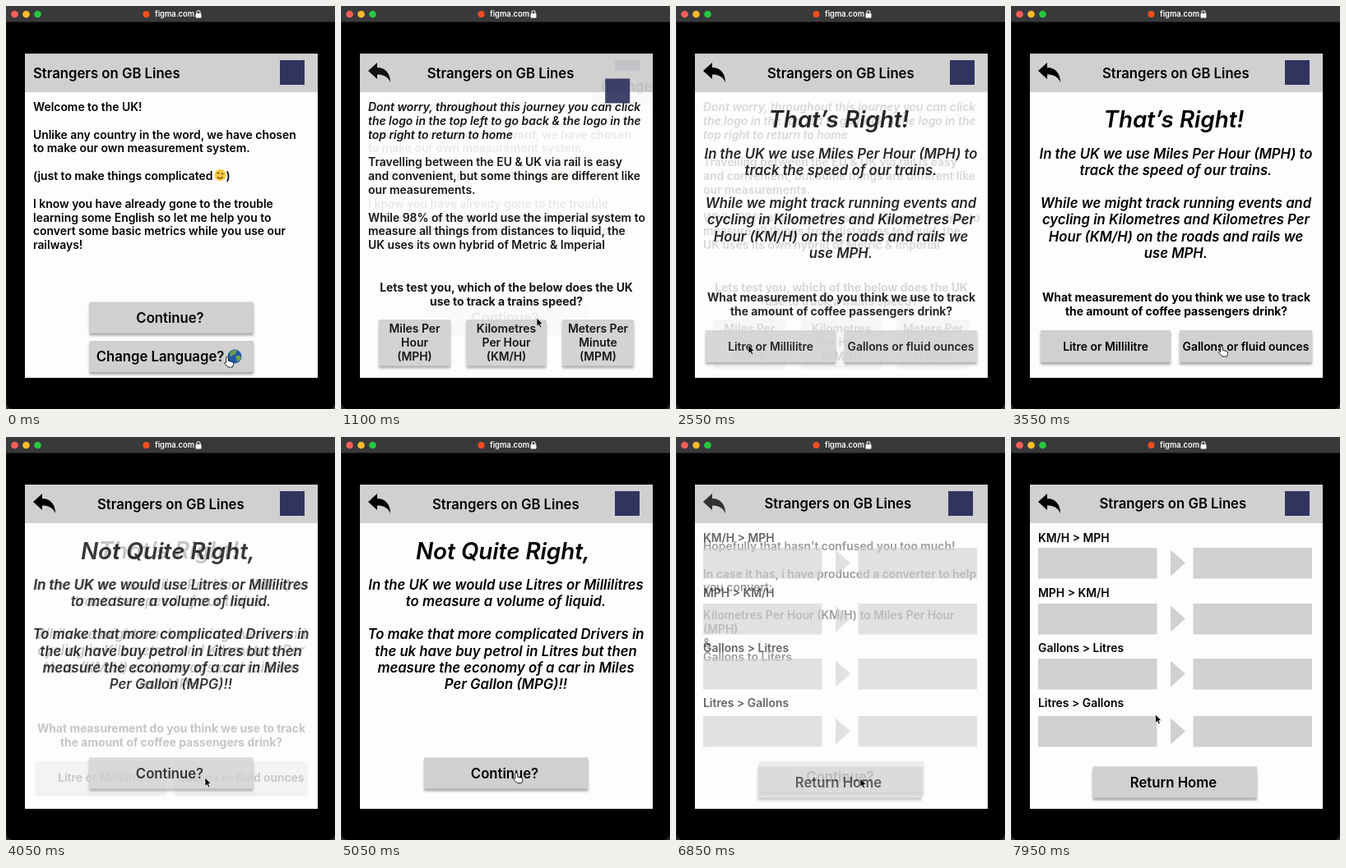
An HTML page for the animation above (8 s loop, 400x491 px).

```html
<!DOCTYPE html>
<html lang="en">
<head>
<meta charset="utf-8">
<title>Rail guide</title>
<style>
  html, body { margin: 0; width: 100%; height: 100%; overflow: hidden; background: #2a2a2c; }
  svg { display: block; width: 400px; height: 491px; }
  text { font-family: Inter, Arial, sans-serif; font-weight: 600; fill: #000; white-space: pre; }
  .button { fill: #d0d0d1; filter: drop-shadow(0 3px 1.5px #0005); }
  .field { fill: #d0d0d1; }
  .mark { fill: #30345f; }
</style>
</head>
<body>
<svg viewBox="0 0 400 491">
  <defs>
    <clipPath id="pageClip"><rect x="23" y="58" width="356" height="395"/></clipPath>
    <path id="back" d="M33 79L44 69V75C54 75 60 82 60 93C57 86 52 83.5 44 83.5V89Z"/>
  </defs>
  <rect x=".5" y="-10" width="399.5" height="501" rx="8"/>
  <rect width="400" height="19.5" fill="#39393b"/>
  <circle cx="10.5" cy="10" r="4.3" fill="#ff5f57"/>
  <circle cx="24.5" cy="10" r="4.3" fill="#febc2e"/>
  <circle cx="38.5" cy="10" r="4.3" fill="#28c840"/>
  <circle cx="170.5" cy="10" r="4" fill="#f24e1e"/>
  <text x="181" y="13.3" font-size="9.3" style="fill:#fff">figma.com</text>
  <rect x="230.5" y="9" width="7" height="5.5" rx="1" fill="#fff"/>
  <path d="M232 9.5V7.8a2 2 0 0 1 4 0V9.5" fill="none" stroke="#fff" stroke-width="1.1"/>
  <g clip-path="url(#pageClip)">
    <rect x="23" y="58" width="356" height="395" fill="#fdfdfd"/>
    <rect x="23" y="58" width="356" height="47" fill="#d0d0d1"/>
    <g id="screens"></g>
    <use id="arrow" href="#back"/>
    <text id="title" font-size="16.7">Strangers on GB Lines</text>
    <rect id="logo" class="mark" x="333" y="66" width="30" height="30"/>
  </g>
  <g id="cursor">
    <path id="pointer" d="M0 0V10.5L2.4 8.3L4 12L5.8 11.2L4.2 7.6H7.4Z" stroke="#fff" stroke-width=".7"/>
    <path id="hand" d="M-1.5 1a1.5 1.5 0 0 1 3 0V4.5L6 5.5Q8 6 7.5 8.5L6.5 12H1L-3.5 7.5Q-3.5 5.5 -1.5 6.5Z"
      fill="#fff" stroke="#111" stroke-width=".9"/>
  </g>
</svg>
<script>
const LOOP = 8000, STEP = 50, FADE = 300;
const SMALL = 13.9, MEDIUM = 16.7, LARGE = 27.8, LEADING = 1.21;
const $ = id => document.getElementById(id);

// Lines of text from a first baseline; an empty string leaves a blank line.
const block = (x, y, lines, { size = SMALL, centred = false, italic = false, weight = 600 } = {}) =>
  lines.map((line, i) => line && `<text x="${x}" y="${y + i * size * LEADING}" font-size="${size}"
    style="font-weight:${weight}${italic ? ';font-style:italic' : ''}"
    text-anchor="${centred ? 'middle' : 'start'}">${line}</text>`).join('');

const button = ({ box: [x, y, w, h], lines, size = MEDIUM, textX = x + w / 2 }) =>
  `<rect class="button" x="${x}" y="${y}" width="${w}" height="${h}"/>` +
  block(textX, y + h / 2 + .364 * size - (lines.length - 1) / 2 * size * LEADING, lines, { size, centred: true });

const converter = (label, baseline, y) => block(33, baseline, [label]) +
  `<rect class="field" x="33" y="${y}" width="144.5" height="37.5"/>
   <rect class="field" x="221.5" y="${y}" width="144.5" height="37.5"/>
   <path class="field" d="M194 ${y + 2.5}L212 ${y + 18.5}L194 ${y + 34.5}Z"/>`;

const wink = `<g transform="translate(260.5 206)"><circle r="7" fill="#fbc93d"/>
  <path d="M-4 -2q1.5 -1.5 3 0M-3.5 2.5q3 3 6.5 0" fill="none" stroke="#5b3512" stroke-width="1.1"/>
  <circle cx="2.7" cy="-1.5" r="1.1" fill="#5b3512"/></g>`;
const globe = `<g transform="translate(278 427)"><circle r="8.5" fill="#2456a8"/>
  <path d="M-6 -5Q-2 -9 3 -7L1 -3L-3 -1L-5 1ZM1 0Q6 -3 8 1Q6 6 3 6Z" fill="#6f9d4c"/></g>`;

const heading = { size: LARGE, centred: true, italic: true };
const answer = { size: MEDIUM, centred: true, italic: true };
const question = { centred: true, weight: 700 };

const screens = [
  {
    titleX: 33, titleY: 87.5, logoX: -147, logoY: 280,
    body: '<rect class="mark" x="333" y="66" width="30" height="30"/>' + block(33, 128, [
      'Welcome to the UK!', '',
      'Unlike any country in the word, we have chosen', 'to make our own measurement system.', '',
      '(just to make things complicated<tspan x="267.5">)</tspan>', '',
      'I know you have already gone to the trouble', 'learning some English so let me help you to',
      'convert some basic metrics while you use our', 'railways!']) + wink,
    buttons: [
      { box: [101.5, 360.5, 199.5, 38], lines: ['Continue?'], textX: 199.5 },
      { box: [101.5, 408, 199.5, 38], lines: ['Change Language?'], textX: 187.5, extra: globe, id: 'language' }]
  },
  {
    titleX: 111, titleY: 87.5, logoX: 0, logoY: 0,
    body: block(33, 128, [
      'Dont worry, throughout this journey you can click', 'the logo in the top left to go back &amp; the logo in the',
      'top right to return to home'], { italic: true }) +
      block(33, 195.3, [
        'Travelling between the EU &amp; UK via rail is easy', 'and convenient, but some things are different like',
        'our measurements.', '', 'While 98% of the world use the imperial system to',
        'measure all things from distances to liquid, the', 'UK uses its own hybrid of Metric &amp; Imperial']) +
      block(201, 348, ['Lets test you, which of the below does the UK', 'use to track a trains speed?'], question),
    buttons: [
      { box: [46, 382, 87, 56.5], lines: ['Miles Per', 'Hour', '(MPH)'], size: SMALL },
      { box: [152.5, 382, 97, 56.5], lines: ['Kilometres', 'Per Hour', '(KM/H)'], size: SMALL },
      { box: [269, 382, 87, 56.5], lines: ['Meters Per', 'Minute', '(MPM)'], size: SMALL }]
  },
  {
    titleX: 111, titleY: 87.5, logoX: 0, logoY: 0,
    body: block(198, 148, ['That’s Right!'], heading) + block(200.5, 185.5, [
      'In the UK we use Miles Per Hour (MPH) to', 'track the speed of our trains.', '',
      'While we might track running events and', 'cycling in Kilometres and Kilometres Per',
      'Hour (KM/H) on the roads and rails we', 'use MPH.'], answer) +
      block(201, 360, ['What measurement do you think we use to track', 'the amount of coffee passengers drink?'], question),
    buttons: [
      { box: [36, 395, 158, 39], lines: ['Litre or Millilitre'], size: SMALL },
      { box: [205, 395, 161, 39], lines: ['Gallons or fluid ounces'], size: SMALL }]
  },
  {
    titleX: 111, titleY: 87.5, logoX: 0, logoY: 0,
    body: block(197, 149, ['Not Quite Right,'], heading) + block(200.5, 185.8, [
      'In the UK we would use Litres or Millilitres', 'to measure a volume of liquid.', '',
      'To make that more complicated Drivers in', 'the uk have buy petrol in Litres but then',
      'measure the economy of a car in Miles', 'Per Gallon (MPG)!!'], answer),
    buttons: [{ box: [101, 390.5, 199.5, 38], lines: ['Continue?'], textX: 199 }]
  },
  {
    titleX: 107.5, titleY: 87.5, logoX: -5, logoY: 0,
    body: '<use href="#back"/>' + block(33, 138, [
      "Hopefully that hasn't confused you too much!", '',
      'In case it has, i have produced a converter to help', 'you convert:', '',
      'Kilometres Per Hour (KM/H) to Miles Per Hour', '(MPH)', '&amp;', 'Gallons to Liters']),
    buttons: [{ box: [101.5, 395, 199.5, 38], lines: ['Continue?'], textX: 199.5 }]
  },
  {
    titleX: 107.5, titleY: 86.5, logoX: 0, logoY: 0,
    body: '<use href="#back"/>' + converter('KM/H &gt; MPH', 128, 135) + converter('MPH &gt; KM/H', 195, 203) +
      converter('Gallons &gt; Litres', 262, 270) + converter('Litres &gt; Gallons', 329, 340),
    buttons: [{ box: [99.5, 401.5, 199.5, 38], lines: ['Return Home'], textX: 197.5 }]
  }
];

const changes = [865, 2345, 3870, 5440, 6720];
const cursorPath = [
  [0, 269, 428], [250, 267, 426], [700, 231, 386], [900, 233, 380], [1100, 238, 380], [1300, 228, 384],
  [1900, 98, 405], [2300, 88, 413], [2800, 88, 413], [3450, 256, 415], [3700, 256, 415], [4050, 242, 415],
  [4650, 242, 415], [5300, 199, 407], [5600, 197, 406], [6300, 213, 414], [6850, 224, 416],
  [7150, 222, 414], [7650, 182, 346], [7950, 175.5, 338]
];

$('screens').innerHTML = screens.map(({ body, buttons }) => `<g>${body}${buttons.map(b =>
  `<g${b.id ? ` id="${b.id}"` : ''}>${button(b)}${b.extra || ''}</g>`).join('')}</g>`).join('');
const layers = [...$('screens').children];

const mix = (a, b, p) => a + (b - a) * p;
const easeOut = t => 1 - (1 - t) ** 1.65;

function cursorAt(time) {
  const next = cursorPath.findIndex(([at]) => at > time);
  if (next < 0) return cursorPath.at(-1).slice(1);
  const [from, to] = [cursorPath[next - 1], cursorPath[next]];
  const t = (time - from[0]) / (to[0] - from[0]), p = t * t * (3 - 2 * t);
  return [mix(from[1], to[1], p), mix(from[2], to[2], p)];
}

function render(time) {
  const current = changes.filter(at => at <= time).length;
  const previous = Math.max(0, current - 1);
  const p = current ? easeOut(Math.min(1, (time - changes[previous]) / FADE)) : 1;
  const from = screens[previous], to = screens[current];
  const between = key => mix(from[key], to[key], p);

  layers.forEach((layer, i) => {
    const opacity = i === current ? p : i === previous ? 1 - p : 0;
    layer.style.display = opacity ? '' : 'none';
    layer.style.opacity = opacity;
  });
  $('title').setAttribute('x', between('titleX'));
  $('title').setAttribute('y', between('titleY'));
  $('logo').setAttribute('transform', `translate(${between('logoX')} ${between('logoY')})`);
  $('logo').style.opacity = current > 1 ? 1 : current * p;
  // The last two screens carry their own back arrow.
  $('arrow').style.opacity = [0, p, 1, 1, 1 - p, 0][current];
  // The language button swaps places with the logo as the first screen leaves.
  const swap = current === 1 ? p : 0;
  $('language').setAttribute('transform', `translate(${224 * swap} ${-358 * swap})`);

  const [x, y] = cursorAt(time);
  const hovering = p === 1 && to.buttons.some(({ box: [bx, by, w, h] }) =>
    x > bx && x < bx + w && y > by && y < by + h);
  $('cursor').setAttribute('transform', `translate(${x} ${y})`);
  $('hand').style.display = hovering ? '' : 'none';
  $('pointer').style.display = hovering ? 'none' : '';
}

const started = performance.now();
function tick() {
  const time = (performance.now() - started) % LOOP;
  render(Math.floor(time / STEP) * STEP);
  requestAnimationFrame(tick);
}
tick();
</script>
</body>
</html>
```
